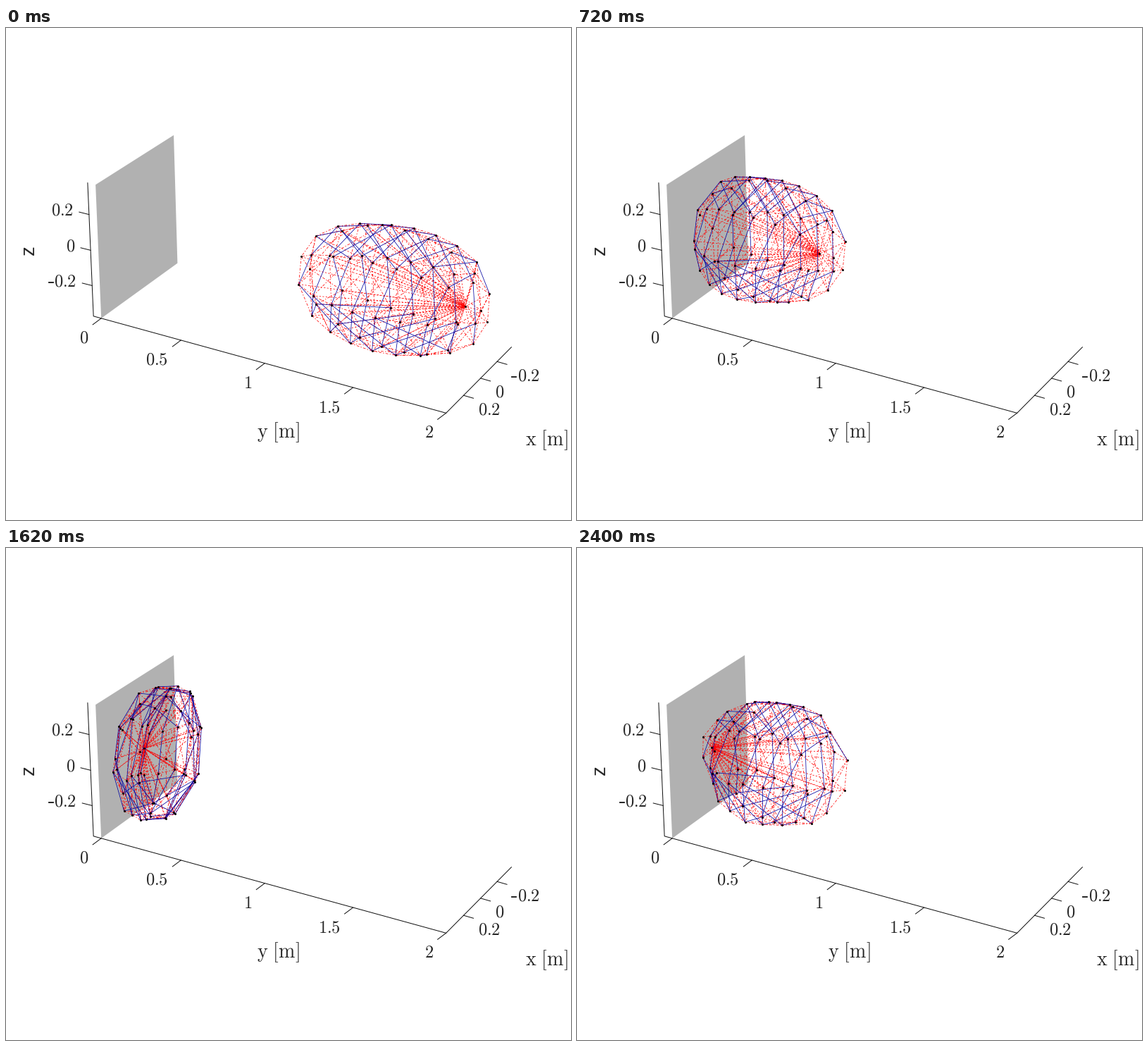
Animation of 802 by 698 pixels, one loop 2460 ms. Source, as a matplotlib script:

```python
from itertools import combinations

import numpy as np
import matplotlib.pyplot as plt
from matplotlib.animation import FuncAnimation
from matplotlib.collections import LineCollection

W, H, DPI = 802, 698, 100
FRAMES, INTERVAL = 41, 60
PX = 72 / DPI
INK, LINE = "#262626", "#111111"

# Limits of the axes, in metres
FRONT, BACK, LOW, HIGH, FAR = .4, -.378, -.375, .375, 2

# Shell: node spacing, radius, half length, height of its axis
STEP, RADIUS, HALF, Z0 = .125, .33, .53, -.015

plt.rcParams["mathtext.fontset"] = "cm"


def fit_camera(points):
    """Perspective matrix that sends each world point to its pixel."""
    rows, rhs = [], []
    for (x, y, z), (u, v) in points:
        p, o = [x, y, z, 1], [0] * 4
        rows += [p + o + [-u * x, -u * y, -u * z],
                 o + p + [-v * x, -v * y, -v * z]]
        rhs += [u, v]
    sol = np.linalg.lstsq(np.array(rows), np.array(rhs), rcond=None)[0]
    return np.append(sol, 1).reshape(3, 4)


CAMERA = fit_camera([
    ((FRONT, 0, HIGH), (126, 223)),
    ((BACK, 0, HIGH), (238, 152)),
    ((BACK, 0, LOW), (243, 332)),
    ((FRONT, 0, LOW), (134, 411)),
    ((FRONT, FAR, LOW), (624, 545)),
    ((BACK, FAR, LOW), (717, 453)),
    ((FRONT, 1, LOW), (369, 475)),
    ((0, 1.52, Z0 + RADIUS), (550, 280)),
    ((0, 1.52, Z0 - RADIUS), (547, 458)),
])


def project(points):
    xyz = np.asarray(points, float)
    q = np.column_stack([xyz, np.ones(len(xyz))]) @ CAMERA.T
    return q[:, :2] / q[:, 2:]


# Nodes: meridian, place along the axis, 0 for a pole
nodes = []
for m in range(8):
    count = 7 if m % 2 else 8
    nodes += [(m, (k - (count - 1) / 2) * STEP, 1) for k in range(count)]
nodes += [(1, -.46, 1), (5, .46, 1), (0, -.475, 0), (0, .475, 0)]
MERIDIAN, T, RIM = np.array(nodes).T
THETA = MERIDIAN * np.pi / 4
RING = RIM * RADIUS * np.sqrt(1 - (T / HALF) ** 2)
HUB = len(nodes)
SHAKE = np.random.default_rng(4).uniform(-1, 1, (HUB, 3))


def connect():
    cables, struts = [], []
    for a, b in combinations(range(HUB), 2):
        gap = T[b] - T[a]
        turn = (MERIDIAN[b] - MERIDIAN[a]) % 8
        upper = MERIDIAN[a]
        if turn == 1:                 # measure from the upper meridian down
            gap, upper = -gap, MERIDIAN[b]
        if not (RIM[a] and RIM[b]):
            if abs(gap) < .12:
                cables.append((a, b))
        elif turn == 0 and abs(gap) < 1.1 * STEP:
            cables.append((a, b))
        elif turn in (1, 7):
            long = np.isclose(gap, 2.5 * STEP) and upper % 2 == 0
            if long or np.isclose(gap, -.5 * STEP):
                struts.append((a, b))
            elif abs(gap) < .6 * STEP or np.isclose(gap, -1.5 * STEP):
                cables.append((a, b))
    return np.array(cables), np.array(struts)


CABLES, STRUTS = connect()
FAN = np.array([(i, HUB) for i in range(HUB)])


def brake(y, stop, width):
    """Follow y, but come softly to rest at stop."""
    return stop + width * np.logaddexp(0, (y - stop) / width)


def pose(n):
    centre = 1.52 - .1025 * n
    p = np.clip((n - 27) / 15, 0, 1)
    rebound = 1 - (1 - p) ** 2

    # Each ring flies in, piles up at the wall, then springs back
    rest = np.maximum(0, .19 - .5 * (T - .25) ** 2)
    crushed = brake(centre + T, rest, .1)
    sprung = .03 + .76 * (T + .5) ** 1.2
    y = crushed + (sprung - crushed) * rebound

    squash = max(0, .95 - np.ptp(y))
    r = RING * (1 + .2 * squash) * (1 - .6 * rebound * np.maximum(0, -T))
    xyz = np.column_stack([r * np.cos(THETA), y, Z0 + r * np.sin(THETA)])
    xyz += SHAKE * .035 * np.clip((n - 11) / 9, 0, 1) * (.4 + .6 * squash)
    xyz[:, 1] = np.maximum(xyz[:, 1], 0)

    hub = brake(centre + .39, .03, .15) - .02 * rebound
    return project(np.vstack([xyz, [0, hub, Z0]]))


fig = plt.figure(figsize=(W / DPI, H / DPI), dpi=DPI, facecolor="white")
ax = fig.add_axes([0, 0, 1, 1])
ax.set_xlim(-.5, W - .5)
ax.set_ylim(H - .5, -.5)
ax.axis("off")


def line(*pts, lw=1):
    ax.plot(*zip(*pts), color=LINE, lw=lw * PX, zorder=2)


def label(u, v, text, ha, size=17.6):
    """Text on baseline v; a leading hyphen is drawn as a short bar."""
    if text[0] == "-":
        text = text[1:]
        bar = u if ha == "left" else u - 40
        line((bar + 1, v - 5.5), (bar + 7, v - 5.5), lw=1.8)
        u += 9 if ha == "left" else 0
    ax.text(u, v, r"$\mathrm{%s}$" % text, size=size, color=INK, ha=ha)


def ticks(points, values, tick, shift, ha):
    for (u, v), value in zip(project(points), values):
        line((u, v), (u + tick[0], v + tick[1]))
        label(u + shift[0], v + shift[1], f"{value:g}", ha)


wall = project([(FRONT, 0, HIGH), (BACK, 0, HIGH), (BACK, 0, LOW), (FRONT, 0, LOW)])
ax.fill(*wall.T, color="#b1b1b1", lw=0, zorder=1)

NEAR = -.05
line(*project([(FRONT, NEAR, HIGH), (FRONT, NEAR, LOW),
               (FRONT, FAR, LOW), (BACK, FAR, LOW)]))
side = (.2, 0, -.2)
ticks([(FRONT, NEAR, z) for z in side], side, (-14, -3.5), (-22, 1), "right")
ticks([(x, FAR, LOW) for x in side], side, (14, 4), (20, 27), "left")
depth = np.linspace(0, FAR, 5)
ticks([(FRONT, y, LOW) for y in depth], depth, (-12, 9), (-18, 35), "right")
label(386, 581, r"y\ [m]", "center", 20.2)
label(767, 592, r"x\ [m]", "center", 20.2)
ax.text(32, 315, "z", family="Liberation Sans", size=19.8, color=INK,
        rotation=90, ha="center", va="center")


def wires(color, style, z):
    lc = LineCollection([], colors=color, linewidths=.75 * PX,
                        linestyles=[style], zorder=z)
    return ax.add_collection(lc)


fan = wires("#ff0000", (0, (3, 3)), 3)
cables = wires("#ff0000", (0, (5, 3, 2, 3)), 4)
struts = wires("#0000a0", "solid", 5)
dots, = ax.plot([], [], "o", color="black", ms=3 * PX, mew=0, zorder=6)


def draw(n):
    pts = pose(n)
    for group, pairs in ((fan, FAN), (cables, CABLES), (struts, STRUTS)):
        group.set_segments(pts[pairs])
    dots.set_data(pts[:, 0], pts[:, 1])
    return fan, cables, struts, dots


anim = FuncAnimation(fig, draw, frames=FRAMES, interval=INTERVAL, repeat=True)
plt.show()
```
